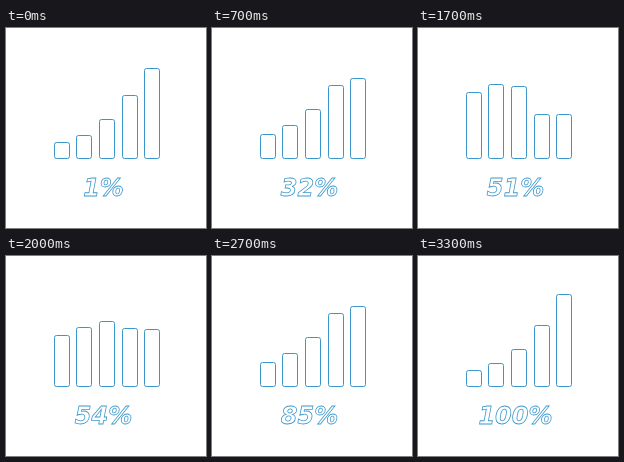
These frames come from a looping animation (200x200 px, 3.4 s). An HTML page:

```html
<!DOCTYPE html>
<html lang="en">
<head>
<meta charset="utf-8">
<style>
  html, body { margin: 0; width: 100%; height: 100%; overflow: hidden; background: #fff; }
  svg { display: block; width: 200px; height: 200px; }
  rect, text { fill: #fff; stroke: #3b97cb; }
  text { font: italic bold 24px "DejaVu Sans", sans-serif; text-anchor: middle; stroke-width: .8; }
</style>
</head>
<body>
<svg viewBox="0 0 200 200"><text x="97.5" y="168"></text></svg>
<script>
const LOOP = 3400, STEP = 100, MIDDLE = LOOP / 2, BEND = 740;
const svg = document.querySelector('svg');
const label = document.querySelector('text');

// Heights at the ends of the loop, at the bends and in the middle.
const bars = [
  { edge: 16, bend: 29, mid: 66 },
  { edge: 23, bend: 38, mid: 74 },
  { edge: 37, bend: 54, mid: 72 },
  { edge: 61, bend: 78, mid: 44 },
  { edge: 92, bend: 75, mid: 44 }
];
const percent = [[0, 1], [700, 32], [1300, 46], [2000, 54], [2400, 73], [3000, 96], [3300, 100]];

const mix = (a, b, k) => a + (b - a) * k;

function percentAt(t) {
  const i = Math.max(1, percent.findIndex(([time]) => t <= time));
  const [t0, p0] = percent[i - 1], [t1, p1] = percent[i];
  return Math.round(mix(p0, p1, (t - t0) / (t1 - t0)));
}

// Rises and falls mirror each other; the outer part moves at one steady speed.
function heightAt({ edge, bend, mid }, t) {
  const d = Math.min(1500 + STEP, Math.abs(Math.max(t, 2 * STEP) - MIDDLE));
  if (d < BEND) return mix(mid, bend, d / BEND);
  const travel = Math.min(Math.abs(edge - bend), (d - BEND) / 50);
  return bend + Math.sign(edge - bend) * travel;
}

const rects = bars.map((_, i) => {
  const rect = document.createElementNS(svg.namespaceURI, 'rect');
  const attrs = { x: 48.5 + Math.floor(i * 22.7), width: 15, rx: 2 };
  for (const name in attrs) rect.setAttribute(name, attrs[name]);
  return svg.appendChild(rect);
});

function draw(time) {
  const step = Math.floor(time % LOOP / STEP);
  const t = step < 2 ? 0 : step * STEP;
  rects.forEach((rect, i) => {
    const h = Math.round(heightAt(bars[i], t));
    rect.setAttribute('y', 130.5 - h);
    rect.setAttribute('height', h);
  });
  label.textContent = percentAt(t) + '%';
}

const start = performance.now();
function tick() {
  draw(performance.now() - start);
  requestAnimationFrame(tick);
}
tick();
</script>
</body>
</html>
```
